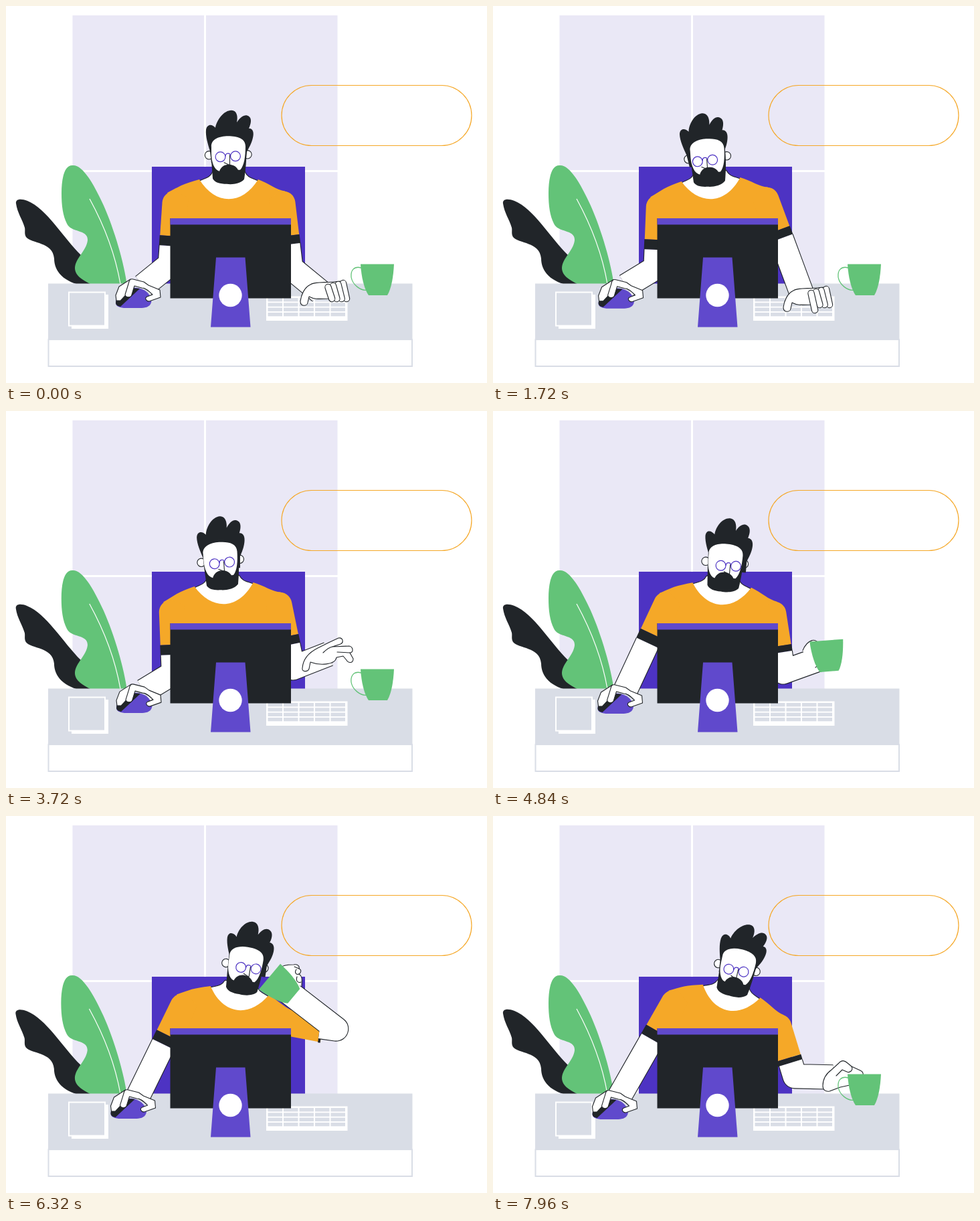
An HTML page for the animation above (8000 ms loop, 719 px wide and 563 px high).

```html
<!DOCTYPE html>
<html lang="en">
<head>
<meta charset="utf-8">
<title>Desk worker</title>
<style>
  html, body { margin: 0; width: 100%; height: 100%; overflow: hidden; background: #fff; }
  svg { display: block; width: 719px; height: 563px; }
  .ink { fill: #212529; }
  .orange { fill: #f5a828; }
  .violet { fill: #6049cc; }
  .green { fill: #63c378; }
  .grey { fill: #d9dde6; }
  .white { fill: #fff; }
  .skin { fill: #fff; stroke: #212529; stroke-width: 1.1; stroke-linejoin: round; }
  .line { fill: none; stroke: #212529; stroke-width: 1.1; stroke-linecap: round; stroke-linejoin: round; }
  .limb { fill: none; stroke-linejoin: round; }
  .finger { fill: none; stroke-linecap: round; }
  .outer { stroke: #212529; stroke-width: 37.5; }
  .inner { stroke: #fff; stroke-width: 35.3; }
  .finger.outer { stroke-width: 10.4; }
  .finger.inner { stroke-width: 8.2; }
</style>
</head>
<body>
<svg viewBox="0 0 719 563">
  <path fill="#eae8f6" d="M99.500 14H495.500V415H99.500Z"/>
  <path stroke="#fff" stroke-width="3" d="M297.500 14V415M99 246.500H496"/>
  <path fill="#4d33c3" d="M218 240H447V415H218Z"/>
  <rect x="412" y="118.500" width="284" height="90" rx="45" fill="none" stroke="#f5a828" stroke-width="1.200"/>

  <g id="leaves">
    <path class="ink" d="M15 295C14 288 22 287 32 291C60 302 85 345 112 372L135 418H118C86 413 72 396 72 377C70 352 38 355 30 345C27 340 29 336 28 331C24 318 17 309 15 295Z"/>
    <path class="green" d="M83 280C83 255 88 238 99 238C115 236 132 268 146 298C162 334 177 385 181 418H132C115 410 103 403 103 391C104 376 120 366 122 350C123 333 97 339 91 325C85 313 83 298 83 280Z"/>
    <path fill="none" stroke="#fff" stroke-width="1.200" d="M125 288C148 330 164 375 171 415"/>
  </g>

  <path class="grey" d="M63 414.500H607.500V499H63Z"/>
  <path fill="#fff" stroke="#d9dde6" stroke-width="2" d="M63.500 498H607V538H63.500Z"/>
  <path class="white" d="M98 431H153V482H98Z"/>
  <path fill="#d9dde6" stroke="#fff" stroke-width="2" d="M94 427.500H148V477.500H94Z"/>
  <path class="white" d="M389 433.500H510.500V470H389Z"/>
  <g id="keys" class="grey"></g>

  <g id="torso">
    <path class="skin" d="M-44 2C-36 -2 -28 -2 -24 -12H24C28 -2 36 -2 44 2L30 34H-30Z"/>
    <path class="orange" d="M-44 0C-55 3 -64 6 -71 9C-77 12 -84 16 -92 20L-83 36L-70 100H70L83 36L84 17.500C72 16 60 6 44 0C20 39 -20 39 -44 0Z"/>
  </g>

  <g id="leftArm"></g>
  <g id="rightArm"></g>

  <g id="head">
    <circle class="skin" cx="-28.500" cy="-2" r="6.200"/>
    <circle class="skin" cx="29" cy="-3" r="6.200"/>
    <path id="hair" class="ink" d="M-27 -8C-30 -18 -34 -30 -33 -40C-31 -50 -23 -48 -19 -43C-17 -55 -6 -69 5 -69C13 -69 15 -60 13 -51C19 -60 26 -64 31 -60C36 -57 34 -48 31 -42C37 -42 39 -36 37 -28C35 -19 31 -13 28 -7L26 10H-25Z"/>
    <path class="ink" d="M-26 -20H27C28 0 27 15 24 34C18 41 6 42 -2 41C-12 41 -20 39 -23 33L-25 5Z"/>
    <path class="white" d="M-25 -14C-26 -26 -13 -30.500 0 -30.500C14 -30.500 26 -27 26 -15C26 0 24 14 18 20L15 20C12 14 6 12 1 12C-6 12 -11 16 -13 22C-21 20 -25 8 -25 -5Z"/>
    <g id="glasses">
      <g fill="none" stroke="#4d33c3" stroke-width="1.200">
        <circle cx="-11.500" cy=".5" r="7.400"/>
        <circle cx="11" cy="-.5" r="7.400"/>
        <path d="M-4 0C-4 -6 3 -6 3.500 -1"/>
      </g>
      <path class="line" d="M2.500 -2V13L-6 9"/>
    </g>
  </g>

  <path class="ink" d="M245.500 317H426V436.500H245.500Z"/>
  <path class="violet" d="M245.500 317H426V326.500H245.500ZM314 375.500H357.500L365.500 479.500H306Z"/>
  <circle class="white" cx="335.500" cy="432" r="17.200"/>

  <g id="mouse">
    <path class="violet" d="M164 443C165 428 180 419 196 421C212 423 219 436 217 443C215 450 207 451 200 451H176C168 450 164 448 164 443Z"/>
    <path class="ink" d="M164 443C165 428 180 419 200 422L171 449C166 448 164 446 164 443Z"/>
    <path class="skin" d="M186 408L169 419L164 432L165 440L171 440L184 426Z"/>
    <path class="skin" d="M183 415C184 409 186 407 190 408L206 412L213 417L230 424L231 435L214 441C209 441 207 436 211 434L219 431C212 424 208 421 203 421L192 418L188 431C187 436 179 436 178 431Z"/>
  </g>

  <g id="typing">
    <path class="skin" d="M500 411C478 414 462 411 455 416C446 420 441 432 440 441C440 449 450 449 451 443L453 434C462 439 472 437 484 437Z"/>
    <g id="fingers"></g>
  </g>
  <g id="reach">
    <path class="skin" d="M443 384C444 370 452 361 466 354L482 346L497 339C504 338 505 346 500 348L488 352L513 351C519 352 520 361 514 361L519 370C519 377 512 377 509 372L504 366L494 368C492 380 468 380 455 375L453 385C451 390 442 390 443 384Z"/>
    <path class="line" d="M488 352C482 353 478 357 474 361M514 361L495 360"/>
  </g>
  <g id="grip">
    <path class="skin" d="M493 403C493 392 499 384 506 379L517 369C521 364 526 365 530 369L536 374L549 380C555 383 554 388 550 390L533 402L519 405L503 411C497 412 493 409 493 403Z"/>
    <path class="line" d="M536 374C539 380 533 384 529 382L522 379L513 388"/>
  </g>
  <g id="fist">
    <path class="skin" d="M-17 8C-20 0 -20 -8 -17 -13C-15 -18 -4 -18 2 -18C8 -19 11 -16 10 -12C15 -10 12 -5 10 -4C16 0 14 6 14 14"/>
    <path class="line" d="M10 -12L3 -15M10 -4C5 -2 3 -7 6 -11M13 8C8 10 5 6 7 0"/>
  </g>

  <g id="mug">
    <path class="green" d="M-25 -23.500H25C24 -4 21 13 15 23H-13C-19 15 -24 -4 -25 -23.500Z"/>
    <path id="handle" fill="none" stroke="#63c378" stroke-width="1.300" d="M-24 -18C-35 -21 -40 -14 -39 -4C-37 7 -25 17 -15 15"/>
  </g>
</svg>

<script>
const LOOP = 8000;
const MUG_REST = [555, 409];
const $ = id => document.getElementById(id);
const set = (id, name, value) => $(id).setAttribute(name, value);
const show = (id, on) => set(id, 'visibility', on ? 'visible' : 'hidden');
const move = (id, x, y, angle = 0) => set(id, 'transform', `translate(${x} ${y}) rotate(${angle})`);
const clamp = (v, low, high) => Math.max(low, Math.min(high, v));
const mix = (a, b, k) => a + (b - a) * k;
const ease = k => (1 - Math.cos(Math.PI * clamp(k, 0, 1))) / 2;
const ramp = (t, from, to) => ease((t - from) / (to - from));

// Key points as [time, value...]; everything else follows from these.
const leanKeys = [[0, 0], [1720, -4], [3720, -4], [4240, 11], [4840, 5], [5640, 9], [7120, 8.5], [7960, 12.8]];
const nodKeys = [[0, 0], [1720, 4], [3720, 1.5], [4840, 4], [5640, 1], [7120, 1], [7960, 4]];
const turnKeys = [[0, 0], [1720, -3.5], [3720, 2.5], [4840, 6], [7120, 6], [7960, 0]];
const mouseKeys = [[0, 0], [1300, -7], [3720, 1], [4300, -7.5], [6320, -7.5], [7120, -17], [7960, -15.5]];
const wristKeys = [[0, 470, 427], [1720, 464, 436], [3200, 470, 432], [3720, 482, 363], [4240, 508, 390],
  [4320, 508, 390], [4840, 500, 366], [5640, 412, 255], [6320, 412, 255], [7120, 460, 273], [7800, 508, 390]];

function sample(keys, t) {
  const i = keys.findIndex(key => key[0] > t);
  if (i < 0) return keys[keys.length - 1].slice(1);
  const a = keys[i - 1], b = keys[i], k = ramp(t, a[0], b[0]);
  return a.slice(1).map((v, n) => mix(v, b[n + 1], k));
}

const outlined = (type, d) => `<path class="${type} outer" d="${d}"/><path class="${type} inner" d="${d}"/>`;

// Two bones from shoulder to wrist; side is -1 for the left arm, 1 for the right.
function drawArm(id, side, torso, wrist, upper, fore, cuff) {
  const [cx, cy, tilt] = torso, r = tilt * Math.PI / 180;
  const lx = side * 81.5, ly = 35.5;
  const x = cx + lx * Math.cos(r) - ly * Math.sin(r);
  const y = cy + lx * Math.sin(r) + ly * Math.cos(r);
  const dx = wrist[0] - x, dy = wrist[1] - y, reach = Math.hypot(dx, dy);
  const bend = Math.acos(clamp((upper ** 2 + reach ** 2 - fore ** 2) / (2 * upper * reach), -1, 1));
  const angle = Math.atan2(dy, dx) + side * bend;
  const along = d => `${x + d * Math.cos(angle)} ${y + d * Math.sin(angle)}`;
  const skin = `M${along(Math.min(49 + cuff, upper - 1))}L${along(upper)}L${wrist.join(' ')}`;
  $(id).innerHTML =
    `<g transform="translate(${x} ${y}) rotate(${angle * 180 / Math.PI - 90}) scale(${-side} 1)">
      <path class="orange" d="M-18 0A18 18 0 0 1 0 -18L20 -10L23 49H-18Z"/>
      <path class="ink" d="M-18.500 49H24V${49 + cuff}H-18.500Z"/>
    </g>` + outlined('limb', skin);
}

function drawFingers(t) {
  const press = 4 * (1 - Math.cos(2 * Math.PI * t / 688));
  let out = '';
  for (let i = 0; i < 4; i++) {
    const tip = i === 3 ? press : 0;
    out += outlined('finger', `M${504 - 7.5 * i} ${414 + 2 * i}L${509 - 7.3 * i} ${437 + tip}`);
  }
  $('fingers').innerHTML = out;
}

function draw(t) {
  const [lean] = sample(leanKeys, t), [nod] = sample(nodKeys, t), [turn] = sample(turnKeys, t);
  const [slide] = sample(mouseKeys, t), wrist = sample(wristKeys, t);
  const forward = Math.max(0, lean);

  const gust = (centre, width) => Math.exp(-(((t - centre) / width) ** 2));
  set('leaves', 'transform', `rotate(${-1.8 * (gust(3000, 420) + gust(6760, 320))} 120 415)`);

  // How firmly the mug is held, and how far it is tipped towards the mouth.
  const hold = ramp(t, 4300, 4800) * (1 - ramp(t, 7250, 7800));
  const sip = hold * clamp((508 - wrist[0]) / 96, 0, 1);

  const torso = [333 + 1.85 * lean, 259 + forward * .2, lean];
  move('torso', ...torso);
  move('mouse', slide, Math.abs(slide) / 8);
  drawArm('leftArm', -1, torso, [205 + slide, 418], 91, 52, 15);
  drawArm('rightArm', 1, torso, wrist,
    97 - 1.5 * forward - 14 * sip, 57 + 46 * Math.sqrt(sip), 13 * (1 - sip) - .4 * forward);

  move('head', torso[0] - 1 + Math.min(lean, 8.5), 224.8 + nod, lean);
  set('hair', 'transform', `matrix(1 0 ${Math.abs(turn) * .02} 1 ${turn * .9} 0)`);
  move('glasses', turn, nod / 2);

  const hand = t < 3400 ? 'typing' : t < 4040 ? 'reach' : t < 4480 || t > 7700 ? 'grip' : 'fist';
  for (const name of ['typing', 'reach', 'grip', 'fist']) show(name, name === hand);
  move('typing', wrist[0] - 470, wrist[1] - 427);
  move('reach', wrist[0] - 482, wrist[1] - 363);
  move('grip', wrist[0] - 508, wrist[1] - 390);
  drawFingers(t);
  show('fingers', hand === 'typing');

  const mugX = mix(MUG_REST[0], wrist[0], hold), mugY = mix(MUG_REST[1], wrist[1], hold);
  const side = (1 - sip) ** 4;
  move('mug', mugX, mugY, -50 * sip);
  move('fist', mugX + 16 - 50 * side, mugY - 15 + 18 * side, 60 * side);
  show('handle', hold < .1);
}

let keys = '';
for (let row = 0; row < 4; row++)
  for (let col = 0; col < 5; col++)
    keys += `<rect x="${391.5 + col * 23.5}" y="${436 + row * 7.3}" width="21.5" height="5.4"/>`;
$('keys').innerHTML = keys;

const start = performance.now();
function tick() {
  draw((performance.now() - start) % LOOP);
  requestAnimationFrame(tick);
}
tick();
</script>
</body>
</html>
```
